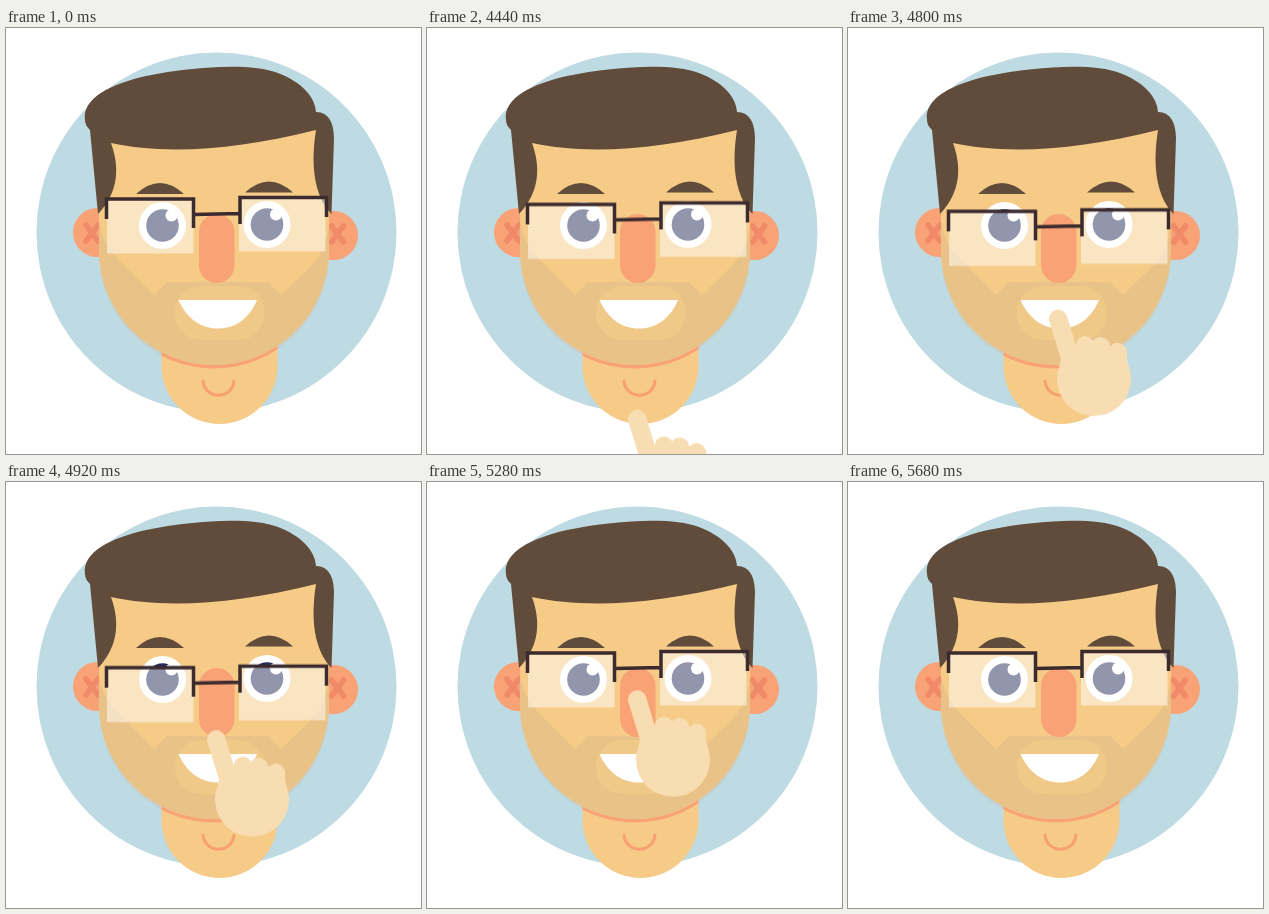
An HTML page without scripts that plays this animation: 415x426 px, repeating every 7920 ms.

```html
<!DOCTYPE html>
<html lang="en">
<head>
<meta charset="utf-8">
<title>Pushing up the glasses</title>
<style>
  html, body { margin: 0; width: 100%; height: 100%; overflow: hidden; background: #fff; }
  svg { display: block; width: 100%; height: 100%; }

  .skin { fill: #f5cb87; }
  .beard { fill: #e9c287; }
  .chin { fill: #f0c887; }
  .pink { fill: #f9a276; }
  .hair { fill: #614c3c; }
  .hand { fill: #f8ddb2; }
  .line { fill: none; stroke: #f9a072; stroke-width: 3; stroke-linecap: round; }
  .cross { fill: none; stroke: #f08a68; stroke-width: 5.5; stroke-linecap: round; }
  .rim { fill: none; stroke: #3b2a2e; stroke-width: 3.5; }
  .lens { fill: #fff; opacity: .5; }

  .glasses, .hand { animation: 7920ms infinite; }
  .glasses { animation-name: slide; }
  .hand { animation-name: push; }

  /* slip down the nose, wait, get pushed back */
  @keyframes slide {
    0% { transform: translateY(0); animation-timing-function: step-end; }
    52.52% { transform: translateY(0); animation-timing-function: steps(20); }
    62.62% { transform: translateY(15.4px); animation-timing-function: step-end; }
    64.14% { transform: translateY(15.4px); animation-timing-function: step-end; }
    64.64% { transform: translateY(14px); animation-timing-function: step-end; }
    65.15% { transform: translateY(10.5px); animation-timing-function: step-end; }
    65.65% { transform: translateY(5px); animation-timing-function: step-end; }
    66.16%, 100% { transform: translateY(0); }
  }
  /* rise, push the bridge, drop away */
  @keyframes push {
    0% { transform: translateY(437px); animation-timing-function: step-end; }
    53.53% { transform: translateY(437px); animation-timing-function: steps(21); }
    64.14% { transform: translateY(203px); animation-timing-function: step-end; }
    64.64% { transform: translateY(199px); animation-timing-function: step-end; }
    65.15% { transform: translateY(195.5px); animation-timing-function: step-end; }
    65.65% { transform: translateY(190px); animation-timing-function: step-end; }
    66.16% { transform: translateY(185px); animation-timing-function: steps(11); }
    71.71%, 100% { transform: translateY(435px); }
  }
</style>
</head>
<body>
<svg viewBox="0 0 415 426">
  <defs>
    <path id="head" d="M93 100H323V222A115 115 0 0 1 93 222Z"/>
    <path id="neck" d="M155.5 290H271.5V338A58 58 0 0 1 155.5 338Z"/>
    <clipPath id="inHead"><use href="#head"/></clipPath>
    <clipPath id="inNeck"><use href="#neck"/></clipPath>
    <path id="cross" d="M-6 -8L6 8M6 -8L-6 8"/>
    <g id="eye">
      <circle r="23.5" fill="#fff"/>
      <circle r="16.3" fill="#252c59"/>
      <circle cx="9" cy="-10" r="6" fill="#fff"/>
    </g>
    <path id="brow" class="hair" d="M0 0Q24 -22 48 0Z"/>
  </defs>

  <circle cx="210.5" cy="204.5" r="180" fill="#bedae2"/>

  <!-- neck and shadow -->
  <use href="#head" y="3" fill="#c3d0d0"/>
  <use href="#neck" class="skin"/>
  <g clip-path="url(#inNeck)"><use href="#head" y="3.5" class="pink"/></g>
  <path class="line" d="M197 353C199 372 226 372 228 353"/>

  <!-- ears -->
  <circle class="pink" cx="91.5" cy="204.5" r="24.5"/>
  <circle class="pink" cx="327.5" cy="207.5" r="24.5"/>
  <use href="#cross" class="cross" x="86" y="205"/>
  <use href="#cross" class="cross" x="331.500" y="206"/>

  <!-- face -->
  <use href="#head" class="skin"/>
  <path class="beard" clip-path="url(#inHead)" d="M93 190C95 212 104 223 116 235L148 267L161 254H262L275 267L303 240C314 229 321 216 323 195V340H93Z"/>
  <rect class="chin" x="169" y="258" width="89.500" height="54" rx="26"/>
  <path fill="#fff" d="M172.500 272H251C243 291 229 300.500 212 300.500S181 291 172.500 272Z"/>

  <!-- hair -->
  <path class="hair" d="M79 92C76 70 105 56 140 48C190 38 245 35 272 45C295 54 309 68 310 84C323 84 328 96 328 110L325.500 186C312 172 303 146 310 102C230 122 160 127 105 115C113 137 114 163 92 186L84 102C81 99 79 96 79 92Z"/>
  <use href="#brow" x="130" y="166"/>
  <use href="#brow" x="239" y="164.500"/>

  <use href="#eye" x="156.500" y="197.500"/>
  <use href="#eye" x="261" y="196.500"/>
  <rect class="pink" x="193" y="186" width="35.500" height="69" rx="17.750"/>

  <g class="glasses">
    <path class="lens" d="M101 171H187.500V225.500H101ZM233 169.500H319.500V223.500H233Z"/>
    <path class="rim" d="M100.500 191V171H187.500V200M234 196V169.500H320.500V189M188 186.500L234 185.500"/>
  </g>

  <g class="hand">
    <circle cx="246" cy="70" r="37"/>
    <path d="M201.300 12A9.200 9.200 0 0 1 219 7L228 37A9 9 0 0 1 245 32A9.500 9.500 0 0 1 262 38A9.300 9.300 0 0 1 279 44C279 54 281 61 283 70H209L213 50Z"/>
  </g>
</svg>
</body>
</html>
```
